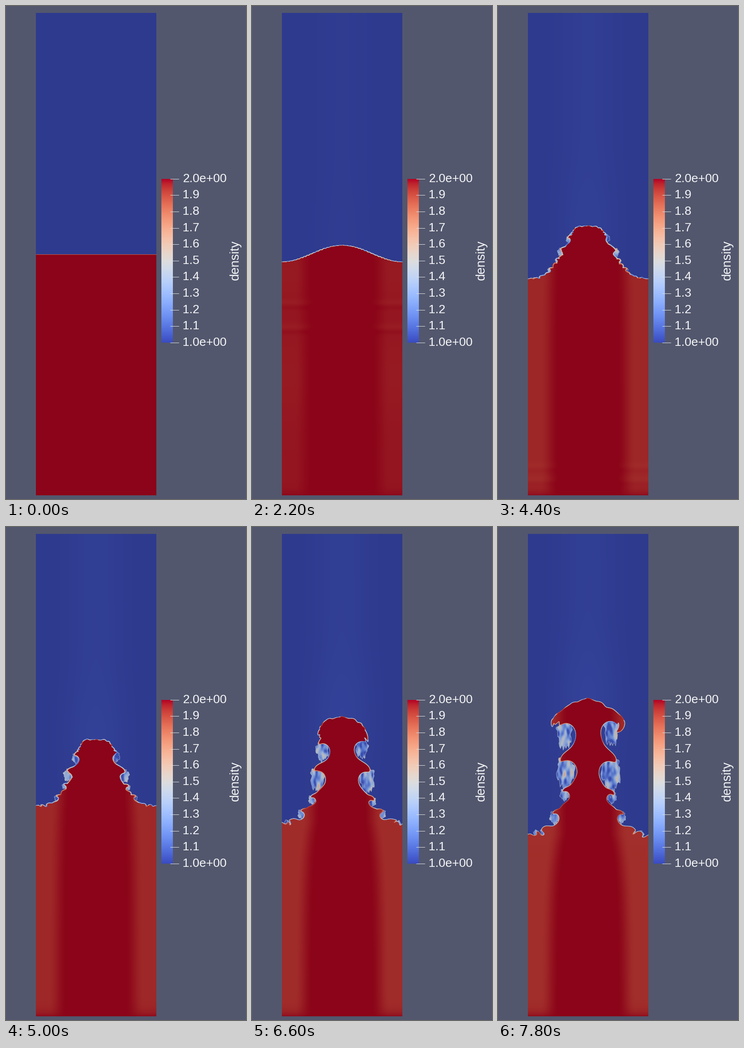
Recreate the animation shown at these times as a matplotlib script. Size 522 by 1072 pixels, loop 8 s.

```python
import numpy as np
import matplotlib.pyplot as plt
from matplotlib.animation import FuncAnimation
from matplotlib.collections import LineCollection
from matplotlib.patches import PathPatch
from matplotlib.path import Path

W, H, DPI = 522, 1072, 100
PX = 72 / DPI                      # points per pixel
LEFT, RIGHT, TOP, BOTTOM = 65, 327, 15, 1064
CX, SPAN = 196, 262
FRAMES, STEP = 40, 200
SUB = 40                           # samples between profile points
ROLL = 3.6                         # seconds until the roll-up begins
CMAP = plt.get_cmap("coolwarm")
TIMES = [0, 1.2, 2.2, 3.6, 5.0, 6.6, 7.8]

# Half profile of the plume, from its top to the wall: distance from the axis, height
rising = [(0, 462), (25, 464), (36, 481), (38, 496), (55, 535),
          (66, 562), (82, 588), (103, 603), (131, 605)]
necking = [(0, 412), (36, 422), (50, 446), (34, 472), (43, 535),
           (60, 590), (82, 622), (105, 638), (131, 640)]
capped = [(0, 372), (42, 389), (75, 419), (40, 431), (36, 515),
          (45, 578), (66, 628), (90, 656), (131, 667)]

# Vortices along each flank: place on the profile, full radius
VORTICES = [(3, 20), (4, 23), (5, 11), (6, 11), (7, 8), (7.5, 7)]


def hermite(x, xs, ys):
    """Smooth curve through (xs, ys); rows of ys may be scalars or arrays."""
    xs, ys = np.asarray(xs, float), np.asarray(ys, float)
    m = np.gradient(ys, xs, axis=0)
    i = np.clip(np.searchsorted(xs, x, "right") - 1, 0, len(xs) - 2)
    h = xs[i + 1] - xs[i]
    s = (x - xs[i]) / h
    shape = np.shape(s) + (1,) * (ys.ndim - 1)
    s, h = np.reshape(s, shape), np.reshape(h, shape)
    return ((1 + 2 * s) * (1 - s) ** 2 * ys[i] + s * (1 - s) ** 2 * h * m[i]
            + s * s * (3 - 2 * s) * ys[i + 1] + s * s * (s - 1) * h * m[i + 1])


def key(t, *values):
    return np.interp(t, TIMES, values)


def smooth(v):
    v = np.clip(v, 0, 1)
    return v * v * (3 - 2 * v)


def bump(d, width):
    return np.exp(-(d / width) ** 2)


def soft_noise(shape, sx, sy, seed):
    n = np.random.default_rng(seed).standard_normal(shape)
    fy = np.fft.fftfreq(shape[0])[:, None]
    fx = np.fft.fftfreq(shape[1])[None, :]
    n = np.fft.ifft2(np.fft.fft2(n) * np.exp(-20 * ((fx * sx) ** 2 + (fy * sy) ** 2))).real
    return n / n.std()


def wave(t):
    """Half profile while the interface is still a cosine."""
    amp = hermite(t, TIMES[:4], [0, 8.5, 18, 39.5])
    x = np.array(rising, float)[:, 0]
    return np.column_stack([x, 539.5 - .55 * t - amp * np.cos(2 * np.pi * x / SPAN)])


def base_curve(t):
    if t <= ROLL:
        u = np.linspace(-131, 131, 16 * SUB + 1)
        half = wave(t)
        amp = (half[-1, 1] - half[0, 1]) / 2
        y = half[0, 1] + amp * (1 - np.cos(2 * np.pi * u / SPAN))
        return np.column_stack([CX + u, y])
    half = hermite(t, TIMES[3:], [wave(ROLL), rising, necking, capped])
    full = np.vstack([half[:0:-1] * [-1, 1], half])
    u = np.linspace(-8, 8, 16 * SUB + 1)
    return hermite(u, np.arange(-8, 9), full) + [CX, 0]


def vortices(p, t):
    """Side, centre, radius and full radius of every vortex on the base curve."""
    rng = np.random.default_rng(12)
    grow = key(t, 0, 0, 0, .12, .5, .82, 1)
    found = []
    for side in (-1, 1):
        for place, size in VORTICES:
            r = size * grow * rng.uniform(.88, 1.15)
            shift = rng.uniform(-4, 4) * grow
            x, y = p[int((8 + side * place) * SUB)]
            found.append((side, x + side * .6 * r, y + .4 * r + shift, r, size))
    return found, grow


def swirl(p, cx, cy, r, angle):
    d = p - [cx, cy]
    a = angle * bump(np.hypot(*d.T), 1.15 * r)
    c, s = np.cos(a), np.sin(a)
    return np.column_stack([cx + d[:, 0] * c - d[:, 1] * s,
                            cy + d[:, 0] * s + d[:, 1] * c])


def outline(t):
    p = base_curve(t)
    k = np.arange(len(p))
    # fine ripples on the flanks
    size = key(t, 0, 0, .7, 2.4, 1.5, 1.3, 1.3)
    size = size * np.abs(np.sin(2 * np.pi * (p[:, 0] - CX) / SPAN)) ** .7
    size *= .7 + .3 * np.sin(.06 * k + 1)
    phase = .36 * k + .8 * np.sin(.045 * k)
    spots, grow = vortices(p, t)
    p[:, 0] += size * np.cos(phase)
    p[:, 1] += size * np.sin(phase) + 1.6 * grow * rough
    if t > ROLL:
        for side, x, y, r, _ in spots:
            p = swirl(p, x, y, r, side * 2.5 * grow ** .5)
    p[:, 0] = np.clip(p[:, 0], LEFT, RIGHT)
    p[0, 0], p[-1, 0] = LEFT, RIGHT
    return p, spots, grow


def billow(side, x, y, r, size, grow, t):
    """Ragged patch of mixed fluid; the big ones stretch downwards."""
    a = np.linspace(0, 2 * np.pi, 60)
    ragged = 1 + .12 * np.sin(5 * a + size + t) + .08 * np.sin(11 * a + side * 2)
    hang = 1.4 * (grow * size / 23) ** 2
    down = np.clip(np.sin(a), 0, 1) * (1 + .25 * np.sin(17 * a + size + t))
    return np.column_stack([x + side * r * ragged * np.cos(a) * .85,
                            y + r * (ragged * np.sin(a) + hang * down)])


X, Y = np.meshgrid(np.arange(LEFT, RIGHT) + .5, np.arange(TOP, BOTTOM) + .5)
R = np.abs(X - CX)
mix_rgb = CMAP(np.clip(.24 + .13 * soft_noise(X.shape, 2.2, 5, 4), .04, .62))[..., :3] * .84
edge_noise = soft_noise((1, 16 * SUB), 4, 1, 9)[0]
rough = soft_noise((1, 16 * SUB + 1), 5, 1, 21)[0]


def heavy(t, surface):
    """Red fluid: dark core, paler flanks and passing pressure waves."""
    late = smooth((t - ROLL) / 4)
    half = 62 - 20 * late * np.exp(-np.clip(Y - surface, 0, None) / 80)
    side = smooth((R - half) / 42)
    b1 = key(t, 830, 805, 645, 945, 1040, 1064, 1064)
    b2 = key(t, 875, 852, 698, 982, 1064, 1064, 1064)
    lobes = np.clip(bump(Y - b1 + 60, 50) + bump(Y - b2 - 105, 85), 0, 1)
    body = side * (1 - key(t, .8, .7, .2, 0, 0, 0, 0) * (1 - lobes))
    reach = smooth((R - 45) / 45) * key(t, 0, .7, 1, 1, 0, 0, 0)
    for b in (b1, b2):
        body += reach * (.25 * bump(Y - b, 8) - .3 * bump(Y - b - 10, 6))
    body = np.clip(body, 0, 1.3) * (1 - .8 * np.exp((Y - BOTTOM) / 10))
    strength = key(t, 0, .32, .52, .75, .85, .95, 1)
    return (np.array([139, 4, 25]) + strength * body[..., None] * [23, 43, 18]) / 255


def light(t, peak):
    glow = bump(X - CX, 62) * (.6 + .5 * bump(Y - peak, 110) * t / 8) * min(t / 5, 1)
    return (np.array([46, 58, 142]) + glow[..., None] * [5, 8, 10]) / 255


fig = plt.figure(figsize=(W / DPI, H / DPI), dpi=DPI, facecolor="#52576d")
ax = fig.add_axes([0, 0, 1, 1])
style = dict(extent=(LEFT, RIGHT, BOTTOM, TOP), interpolation="nearest", aspect="auto")
blue_im = ax.imshow(light(0, 540), zorder=1, **style)
mix_im = ax.imshow(mix_rgb, zorder=2, **style)
red_im = ax.imshow(heavy(0, 540), zorder=4, **style)
rim = PathPatch(Path([(0, 0)]), fc="none", ec=(.74, .74, .78, .7), lw=.9 * PX, zorder=3)
ax.add_patch(rim)
skin = LineCollection([], zorder=5, capstyle="round")
ax.add_collection(skin, autolim=False)

# Colour legend
ax.imshow(np.linspace(1, 0, 256)[:, None], cmap=CMAP, vmin=0, vmax=1, zorder=2,
          extent=(338, 363, 732, 376), interpolation="nearest", aspect="auto")
font = dict(family="Liberation Sans", color="#f4f5f7", va="baseline", ha="left")
for i in range(11):
    y = 375.7 + 35.6 * i
    ax.plot([357, 376], [y, y], color="#dcdfe4", lw=PX, zorder=6,
            solid_capstyle="butt")
    value = 2 - i / 10
    label = f"{value:.1e}" if i in (0, 10) else f"{value:.1f}"
    ax.text(384.5, y + 7.2, label, fontsize=26.4 * PX, **font)
ax.text(505.5, 595.5, "density", fontsize=27.4 * PX, rotation=90,
        rotation_mode="anchor", **font)

ax.set(xlim=(0, W), ylim=(H, 0))
ax.axis("off")


def draw(frame):
    t = frame * STEP / 1000
    p, spots, grow = outline(t)
    blue_im.set_data(light(t, p[:, 1].min()))
    red_im.set_data(heavy(t, p[0, 1]))
    body = np.vstack([p, [(RIGHT, BOTTOM), (LEFT, BOTTOM)], p[:1]])
    red_im.set_clip_path(Path(body), ax.transData)

    rolled = t > ROLL
    mix_im.set_visible(rolled)
    rim.set_visible(rolled)
    if rolled:
        blobs = Path.make_compound_path(*[Path(billow(*s, grow, t)) for s in spots])
        mix_im.set_data(np.roll(mix_rgb, -int(22 * t), axis=0))
        mix_im.set_clip_path(blobs, ax.transData)
        rim.set_path(blobs)

    # Pale diffused skin of the interface
    tone = key(t, .84, .52, .45, .45, .5, .58, .6)
    spread = key(t, 0, .06, .12, .2, .2, .2, .2)
    colors = CMAP(np.clip(tone + spread * edge_noise, .1, .92))
    colors[:, :3] *= .88
    slope = np.abs(np.sin(2 * np.pi * (p[:-1, 0] - CX) / SPAN))
    thick = key(t, .9, 1, 1.1, 1.2, 1.1, 1.1, 1.1) + slope * key(t, 0, .2, .6, 1.3, .9, .5, .3)
    skin.set_segments(np.stack([p[:-1], p[1:]], axis=1))
    skin.set_color(colors)
    skin.set_linewidth(thick * PX)
    return blue_im, mix_im, red_im, rim, skin


anim = FuncAnimation(fig, draw, frames=FRAMES, interval=STEP, repeat=True,
                     repeat_delay=0, blit=False)
plt.show()
```
